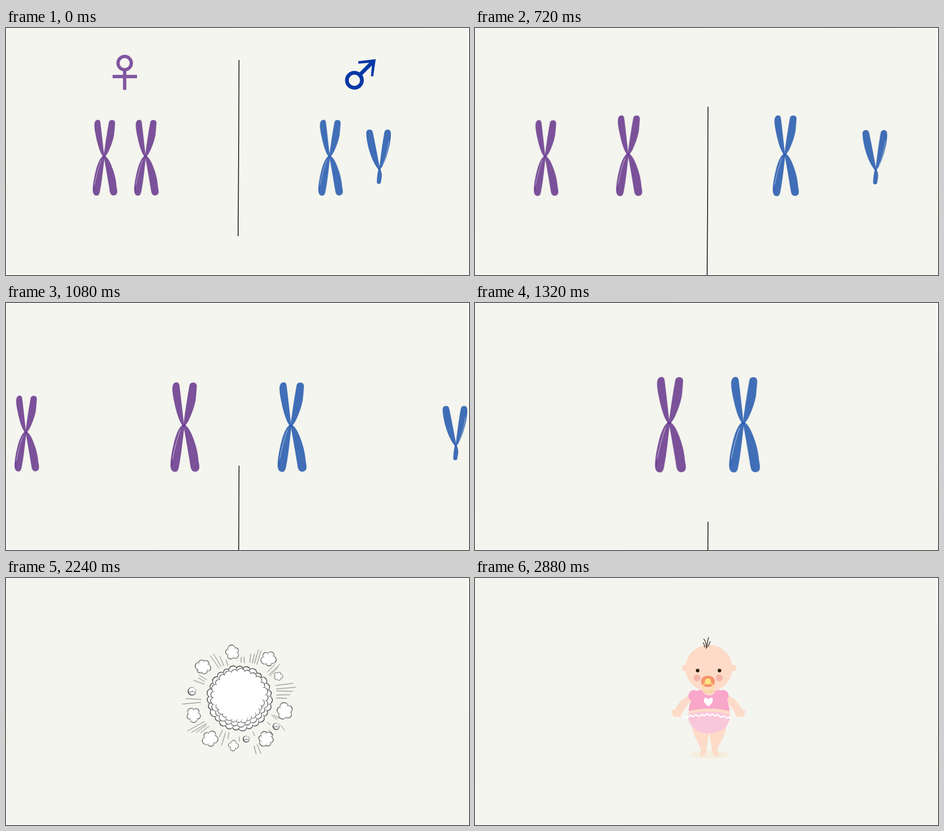
Animation, 1025 px wide and 547 px high, one loop 3.64 s. Source, as an HTML page:

```html
<!DOCTYPE html>
<html lang="en">
<head>
<meta charset="utf-8">
<title>Two X chromosomes</title>
<style>
html, body { margin: 0; width: 100%; height: 100%; overflow: hidden; background: #fdfdfb; }
svg { display: block; width: 100%; height: 100%; }

.purple { color: #7b519a; --dark: #57208a; --shine: #cbbcd2; }
.blue { color: #406eb7; --dark: #1c49ad; --shine: #b3c6dc; }
.gloss { fill: none; stroke-linecap: round; }

.move { animation: move 3640ms infinite; }
.signs { animation: signs 3640ms step-end infinite; }
.pairs { animation: pairs 3640ms step-end infinite; }
.baby { animation: baby 3640ms step-end infinite; }
.blast { animation: blast 3640ms step-end infinite; }
#burst { transform-origin: 515px 271px; animation: grow 3640ms infinite; }

@keyframes move {
  0%, 15.38% { transform: var(--from); animation-timing-function: steps(24, start); }
  41.75%, 100% { transform: var(--to); }
}
@keyframes grow {
  0%, 52.74% { transform: scale(.488); animation-timing-function: steps(24, end); }
  79.1%, 100% { transform: scale(1.256); }
}
@keyframes signs { 0% { visibility: visible } 15.38%, 100% { visibility: hidden } }
@keyframes pairs { 0% { visibility: visible } 53.84%, 100% { visibility: hidden } }
@keyframes blast { 0% { visibility: hidden } 52.74% { visibility: visible } 79.1%, 100% { visibility: hidden } }
@keyframes baby { 0% { visibility: hidden } 79.1%, 100% { visibility: visible } }
</style>
</head>
<body>
<svg viewBox="0 0 1025 547">
  <defs>
    <g id="x" transform="translate(-398.5 -163)">
      <g fill="currentColor">
        <path d="M403.2 180C403 170 406 164 412 163.500C417 163 419.300 166 420 171C424 203 427 233 431 266H428C420 258 415 240 411 225C407 207 403.500 192 403.200 180Z"/>
        <path d="M443.500 171C445 165.500 448 164 453 164C458 164 461.200 168 461 173C460 183 459.500 195 458 206C455 222 449 238 443 251C439 259 435 266 429 267C433 234 438 202 443.500 171Z"/>
        <path d="M432 263C427 305 424 337 419 361C417.500 371 415 375 409 375C402 375 398.500 368 398.700 359C399 342 403 321 408 302C413 284 421 263 432 263Z"/>
        <path d="M429 263C440 264 449 284 456 305C461 320 464 335 465 349C466 355 467 359 467 364C467 371 462 374.500 457 374.500C450 374.500 447 369 446 362C441 330 435 297 429 263Z"/>
      </g>
      <path d="M425 262Q430 267 435 262Q434 268 430 268Q427 268 425 262Z" fill="var(--dark)" opacity=".75"/>
      <path class="gloss" d="M422 276Q411 306 403 348" stroke="var(--shine)" stroke-width="1.2"/>
      <path class="gloss" d="M404 344Q401 353 402 361" stroke="var(--dark)" stroke-width="1.3" opacity=".6"/>
    </g>
    <g id="y">
      <g fill="currentColor">
        <path d="M797.500 235C797 228 800 225 805 225C810 225 811.800 228 812.500 233C818 259 823 286 828 313L825 314C817 305 810 290 806 277C801 262 798 246 797.500 235Z"/>
        <path d="M837.500 232C838.500 227 841 225 845 225C850 225 852.500 229 852 235C852 250 848 267 843 283C838 298 832 312 826 314C829 289 833 256 837.500 232Z"/>
        <path d="M826 310C830 314 832 320 832 326C832 333 830 338 830 342C829 345 826 345.500 824 345C821 344.500 820.500 342 821 338C822 328 822 319 826 310Z"/>
      </g>
      <path d="M823 310Q827 314 830 310Q829 316 826 316Z" fill="var(--dark)" opacity=".7"/>
      <path class="gloss" d="M848 249Q844 281 834 304" stroke="var(--shine)" stroke-width="1"/>
      <path class="gloss" d="M851 235Q850 246 848 252" stroke="var(--dark)" stroke-width="1" opacity=".6"/>
    </g>
  </defs>

  <path d="M0 1.500L1022 2L1025 546L1.800 545L0 130Z" fill="#f4f5ee"/>

  <g class="signs">
    <g fill="none" stroke="#8157a1" stroke-width="7.400">
      <circle cx="262.700" cy="77.700" r="14.700"/>
      <path d="M262.700 94V137M236 107.500H290"/>
    </g>
    <g fill="none" stroke="#0338a6" stroke-width="8.400">
      <circle cx="771.300" cy="115.700" r="16.600"/>
      <path d="M783 104L812 75"/>
    </g>
    <path d="M818.500 69L780 73.500V79L805 77L810 82L808 107H813Z" fill="#0338a6"/>
  </g>

  <path class="move" style="--from:translate(0px,0px);--to:translate(0px,496px)"
        d="M515.800 71L515.200 250L513.800 461" fill="none" stroke="#111" stroke-width="1.800"/>

  <g class="pairs">
    <use href="#x" class="move purple" style="--from:translate(191.900px,203px) scale(.794);--to:translate(-105px,206px) scale(.794)"/>
    <use href="#x" class="move purple" style="--from:translate(283.500px,203px) scale(.794);--to:translate(421.200px,155.300px) scale(1.041)"/>
    <use href="#x" class="move blue" style="--from:translate(691.200px,203px) scale(.794);--to:translate(536.600px,155.300px) scale(1.041)"/>
    <use href="#y" class="move blue" style="--from:translate(0px,0px);--to:translate(290px,5px)"/>
  </g>

  <g class="blast"><g id="burst"></g></g>

  <g class="baby">
    <ellipse cx="518.500" cy="391.500" rx="45" ry="8.500" fill="#f5eddd"/>
    <g fill="#fddbc8">
      <path id="leg" d="M480 322C481 348 495 364 500 379C501 384 497 388 497.500 392C499 396 506 395 509 391C513 386 513 374 515 364L519 336Z"/>
      <use href="#leg" transform="matrix(-1 0 0 1 1037 0)"/>
      <path id="arm" d="M477 259C459 266 450 277 443 291C439 293 436 291 435.500 294C435 297 438 297 438 298C434 300 435 304 439 303C437 307 440 310 445 306C447 309 450 307 451 305C450 308 453 310 455 307L459 298C464 289 472 280 479 270Z"/>
      <use href="#arm" transform="matrix(-1 0 0 1 1034 0)"/>
      <path d="M474 285H563L564 309H472Z"/>
    </g>
    <path d="M472 302Q518 290 564 302C566 328 545 344 518 344S470 328 472 302Z" fill="#f9c7da"/>
    <path d="M466 307.500Q470 310 473 306.500T480 305.500T486 304.500T492 304.500T499 304.500T505 303.500T511 302.500T517 302.500T523 303T529 303.500T535 304T541 305.500T548 307T555 308T561 309T567 310.500" fill="none" stroke="#fff" stroke-width="3" stroke-linecap="round"/>
    <g fill="#f8a6ca">
      <path d="M496 247Q518 256 540 247L554 262Q562 277 563.500 294.500Q518 284 473 294.500Q474 280 481 266Z"/>
      <circle cx="485.300" cy="261" r="12.800"/>
      <circle cx="548.500" cy="261" r="13"/>
    </g>
    <path d="M503 246H534Q531 260 518.500 260Q506 260 503 246Z" fill="#fddbc8"/>
    <path d="M504 248H533L531 253Q518 257 506 253Z" fill="#f5cbb2"/>
    <path d="M516.500 284C509 279 506.500 275 506.500 270C506.500 264 514 263.500 516.500 269C519 263.500 526.700 264 526.700 270C526.700 275 524 279 516.500 284Z" fill="#fff"/>
    <g fill="#fddbc8">
      <circle cx="464.800" cy="199" r="7"/>
      <circle cx="572" cy="199" r="7"/>
      <ellipse cx="517.800" cy="199.500" rx="51.800" ry="51.500"/>
    </g>
    <path d="M508.500 153Q508 147 505.500 143.500M512 156Q513 143 506.500 135M514 153Q513.500 142 517.300 132M517 151Q517.500 145 521 141" fill="none" stroke="#413733" stroke-width="1.700" stroke-linecap="round"/>
    <g fill="#35220f"><circle cx="492.900" cy="205" r="4"/><circle cx="541.200" cy="205" r="4"/></g>
    <g fill="#f6b4a9"><circle cx="491.500" cy="221.200" r="7.600"/><circle cx="540.800" cy="221.200" r="7.600"/></g>
    <path d="M515.700 216.500C525 216.500 531 222 531 229C531 237 525 241.500 515.700 241.500S500.500 237 500.500 229C500.500 222 506 216.500 515.700 216.500Z" fill="#f5946c"/>
    <circle cx="515.900" cy="241" r="10.400" fill="none" stroke="#fbde87" stroke-width="2.200"/>
    <circle cx="515.500" cy="229" r="6.700" fill="#fee481"/>
  </g>
</svg>
<script>
const burst = document.getElementById('burst');
const TAU = Math.PI * 2;

function add(name, attrs) {
  const node = document.createElementNS('http://www.w3.org/2000/svg', name);
  for (const key in attrs) node.setAttribute(key, attrs[key]);
  burst.append(node);
}
const dot = (cx, cy, r, fill = '#fff') => add('circle', { cx, cy, r, fill });
const ink = (d, width) => add('path', { d, fill: 'none', stroke: '#111', 'stroke-width': width, 'stroke-linecap': 'round' });

// A ring of white puffs, each with an outline that thickens outwards.
function puffs(cx, cy, R, r, count, edge, start = 0, sweep = TAU) {
  for (let i = 0; i < count; i++) {
    const a = start + sweep * i / count;
    const dx = Math.cos(a), dy = Math.sin(a);
    const size = r * (1 + .13 * Math.sin(i * 2.4 + R));
    const x = cx + R * dx, y = cy + R * dy;
    dot(x + edge * dx, y + edge * dy, size + .6, '#111');
    dot(x, y, size);
  }
}

function cloud(x, y, size, count, turn) {
  const lean = size * .045;
  dot(x + lean * Math.cos(turn), y + lean * Math.sin(turn), size * .78, '#111');
  puffs(x, y, size * .53, size * .45, count, size * .045, turn);
  dot(x, y, size * .62);
}

function curl(x, y, r) {
  dot(x - .6, y + .5, r + .8, '#111');
  dot(x, y, r - .6);
  ink(`M${x - r * .9} ${y + r * .2}Q${x - r * .1} ${y + r * .5} ${x} ${y - r * .1}M${x + r * .1} ${y - r * .1}Q${x + r * .2} ${y + r * .6} ${x + r * .7} ${y + r * .1}`, 1.1);
}

const upperRays = 'M431 139L457 175M440 133L463 170M459 140L471 168M478 151L483 168M523 142L522 158M531 142L532 160M551 133L548 158M562 132L556 160M574 120L562 161M582 122L569 164M622 164L601 187M638 163L604 196M632 172L609 198M398 196L420 210M395 204L413 215M381 211L413 223';
const lowerRays = 'M677 220L625 227M684 232L627 237M676 244L628 243M668 254L628 255M658 265L627 264M613 314L628 328M620 315L635 325M600 337L610 344M640 345L652 360M605 358L618 374M558 365L562 376M561 406L567 430M570 402L581 429M517 380L517 393M486 367L483 385M476 367L464 405M467 359L457 380';
const leftRays = 'M413 334L363 362M419 340L375 366M418 345L389 366M427 348L402 367M403 268L358 266M402 277L347 282';
[upperRays, lowerRays, leftRays].forEach(d => ink(d, .9));

puffs(517.500, 264.500, 84, 11.500, 27, 1.400, .3);
dot(517.500, 264.500, 82);
puffs(517, 263, 75, 10.500, 25, 1);
dot(517, 262, 76);
puffs(517, 262, 65, 10, 12, .8, .25, 2.7);
dot(514.500, 256, 71);

cloud(496, 128, 20.500, 5, -.5);
cloud(604, 147, 22, 5, 1.500);
cloud(633, 199, 12.500, 5, 2.600);
cloud(652, 303, 24, 5, .8);
cloud(596.500, 386, 22.500, 6, 1.200);
cloud(499, 405, 15, 4, 1.700);
cloud(430, 385, 23, 5, 1.400);
cloud(381, 314.500, 21, 5, 2.800);
cloud(409, 171.500, 22, 6, 2.300);
curl(627, 348, 9.300);
curl(538, 386, 9);
curl(376.500, 243.500, 11.500);
</script>
</body>
</html>
```
